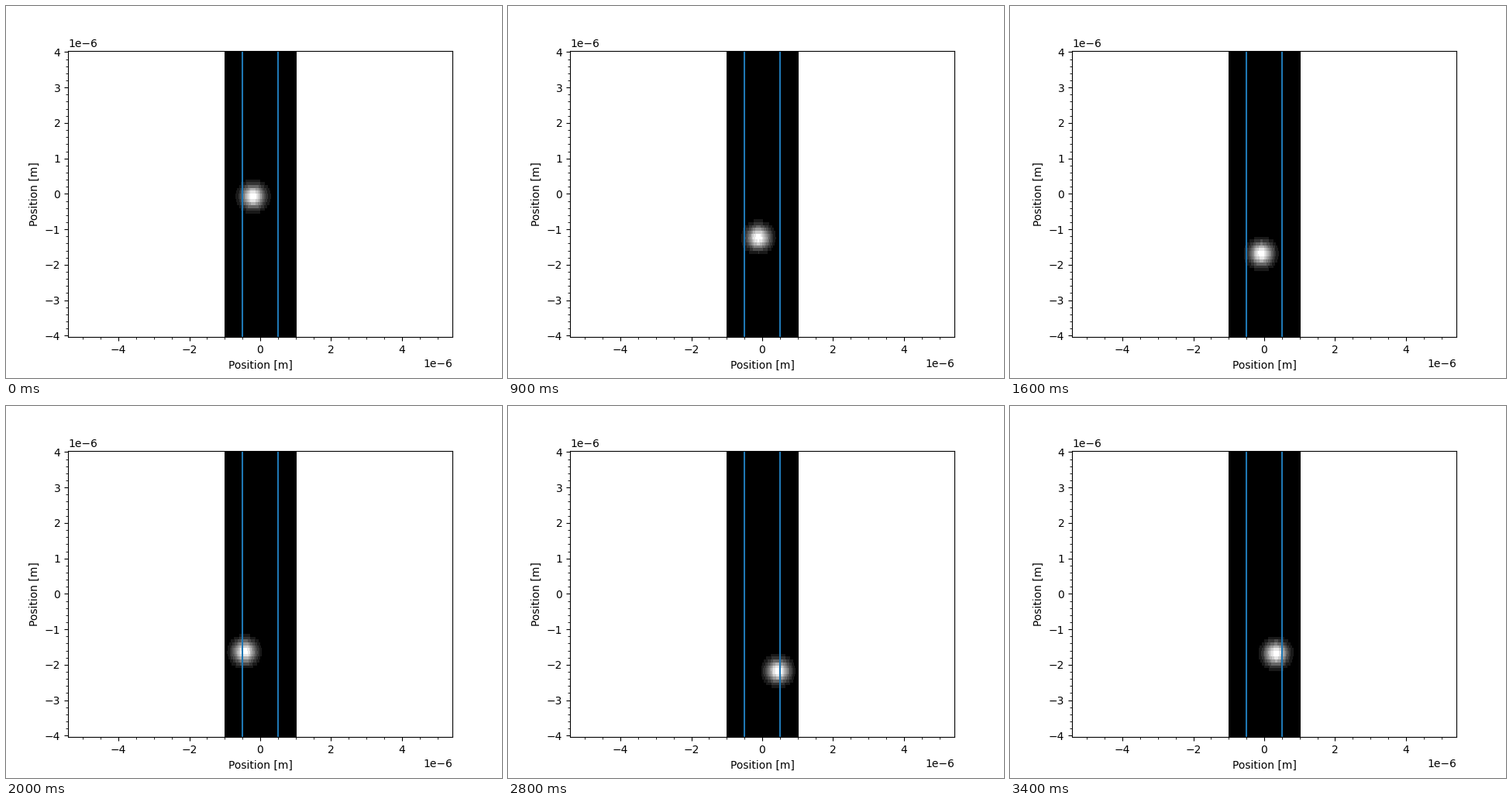
Recreate the animation shown at these times as a matplotlib script. Size 640 px wide and 480 px high, loop 3.5 s.

```python
import numpy as np
import matplotlib.pyplot as plt
from matplotlib.animation import FuncAnimation

UM = 1e-6
FRAMES = 35
GRID = 100                  # samples along each side of the channel
SIGMA = 0.225               # spot width, in microns
PEAK, LEVELS = 10.9, 10     # brightness is counted in whole steps
WALL = 0.5
STEP = 0.1                  # random step of the particle per frame

# Key points of the wandering particle: frame, x, y (microns)
KEYS = [
    (0, -0.21, -0.08), (2, 0.35, 0.49), (5, -0.12, -0.40),
    (6, -0.46, -1.21), (8, -0.04, -0.89), (11, -0.13, -1.87),
    (13, 0.24, -1.74), (20, -0.45, -1.64), (24, -0.27, -2.34),
    (26, -0.20, -2.83), (28, 0.44, -2.18), (31, 0.27, -1.45),
    (34, 0.32, -1.69),
]


def bridge(keys, values, rng):
    """Random walk that passes through the given values at the key frames."""
    frames = np.arange(FRAMES)
    walk = np.cumsum(rng.normal(0, STEP, FRAMES))
    return walk + np.interp(frames, keys, values - walk[keys])


def spot(x, y):
    """Camera image of a Gaussian spot centred on (x, y)."""
    gx = np.exp(-((xs - x) / SIGMA) ** 2 / 2)
    gy = np.exp(-((ys - y) / SIGMA) ** 2 / 2)
    return np.floor(PEAK * np.outer(gy, gx))


xs = np.linspace(-1, 1, GRID)
ys = np.linspace(-4, 4, GRID)

rng = np.random.default_rng(4)
key_t, key_x, key_y = np.array(KEYS).T
key_t = key_t.astype(int)
path_x = np.clip(bridge(key_t, key_x, rng), -WALL, WALL)
path_y = bridge(key_t, key_y, rng)

fig, ax = plt.subplots(figsize=(6.4, 4.8), dpi=100)
half_w, half_h = (s[-1] * GRID / (GRID - 1) * UM for s in (xs, ys))
image = ax.imshow(spot(path_x[0], path_y[0]), cmap="gray", vmin=0, vmax=LEVELS,
                  origin="lower", interpolation="nearest", aspect="auto",
                  extent=(-half_w, half_w, -half_h, half_h))
for side in (-1, 1):
    ax.axvline(side * WALL * UM, color="C0", lw=1.5)

box = ax.get_window_extent()
view_w = half_h * box.width / box.height
ax.set_xlim(-view_w, view_w)
ax.set_ylim(-half_h, half_h)
ax.set_xlabel("Position [m]")
ax.set_ylabel("Position [m]")
ax.minorticks_on()


def update(i):
    image.set_data(spot(path_x[i], path_y[i]))
    return [image]


anim = FuncAnimation(fig, update, frames=FRAMES, interval=100,
                     repeat=True, repeat_delay=0)
plt.show()
```
